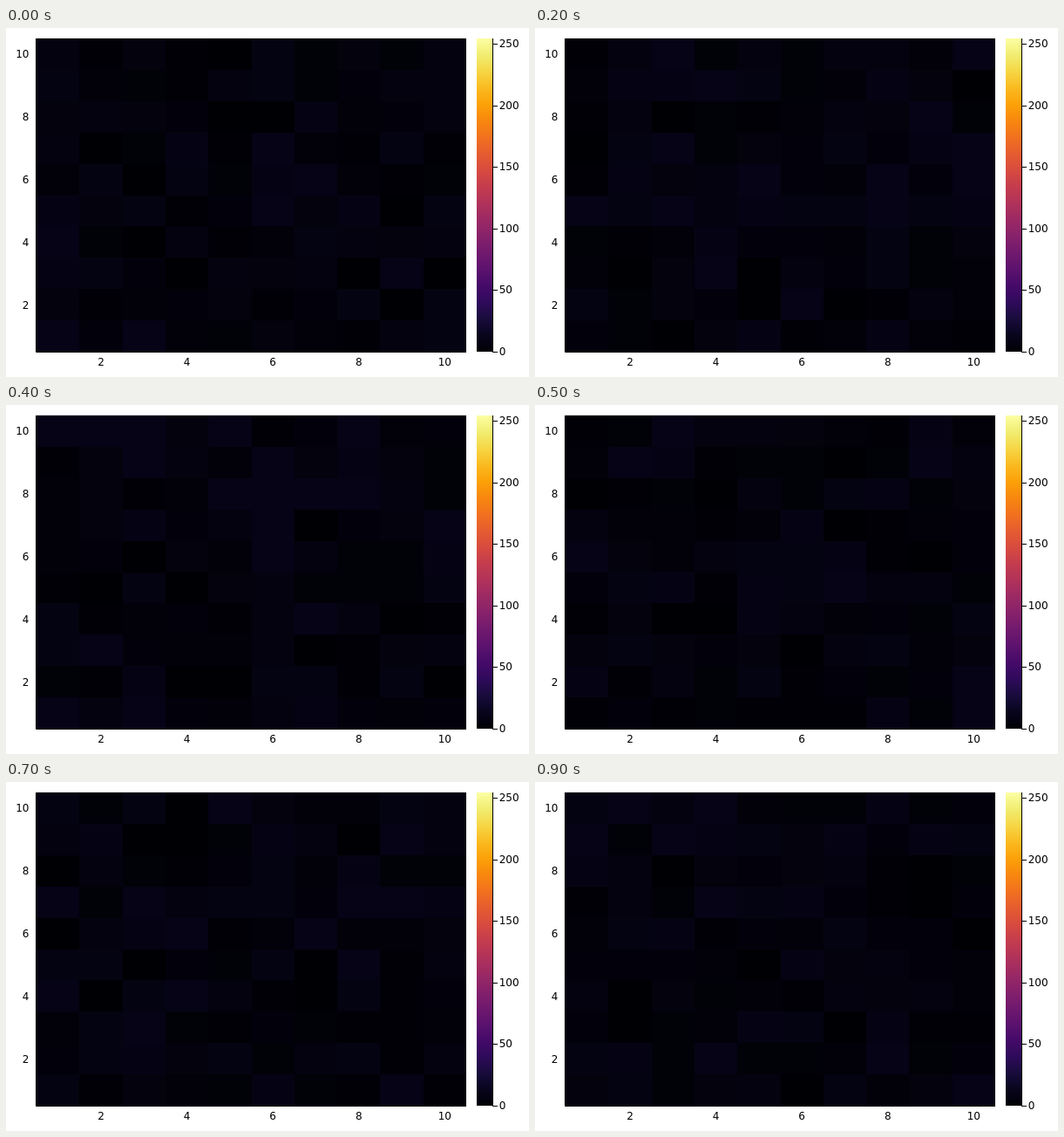
Write an HTML page that moves like this. It is 600x400 px and loops after 1000 ms.

```html
<!DOCTYPE html>
<html lang="en">
<head>
<meta charset="utf-8">
<title>Heatmap</title>
<style>
html, body { margin: 0; width: 100%; height: 100%; overflow: hidden; background: #fff; }
svg { display: block; width: 600px; height: 400px; }
text { font: 12px "DejaVu Sans", sans-serif; fill: #000; }
</style>
</head>
<body>
<svg id="plot" viewBox="0 0 600 400">
  <defs><linearGradient id="scale" x1="0" y1="1" x2="0" y2="0"></linearGradient></defs>
  <rect x="35" y="11.9" width="493" height="359"/>
  <g id="cells" shape-rendering="crispEdges"></g>
  <rect x="540" y="12" width="18" height="359" fill="url(#scale)"/>
  <path d="M34.5 12V371.5H528M558.5 12V371.5" fill="none" stroke="#000"/>
</svg>
<script>
const N = 10, STEP = 100, STEPS = 10, MAX = 9;
const LEFT = 35, TOP = 12, WIDTH = 493, HEIGHT = 359;
const inferno = ('000004 08051d 180c3c 2f0a5b 450a69 5c126e 71196e 87216b 9b2964 b1325a ' +
  'c43c4e d74b3f e55c30 f1711f f8870e fca108 faba20 f6d645 f1ed71 fcffa4').split(' ');

const plot = document.getElementById('plot');

function add(parent, tag, attrs, text) {
  const el = document.createElementNS('http://www.w3.org/2000/svg', tag);
  for (const key in attrs) el.setAttribute(key, attrs[key]);
  if (text !== undefined) el.textContent = text;
  parent.appendChild(el);
  return el;
}

// Colour of a value from 0 to 255
function colour(value) {
  const pos = value / 255 * (inferno.length - 1);
  const i = Math.min(Math.floor(pos), inferno.length - 2);
  const channel = (hex, k) => parseInt(hex.substr(k * 2, 2), 16);
  const mix = k => {
    const a = channel(inferno[i], k), b = channel(inferno[i + 1], k);
    return Math.round(a + (b - a) * (pos - i));
  };
  return `rgb(${mix(0)},${mix(1)},${mix(2)})`;
}

function randomFrom(seed) {
  let s = seed;
  return () => {
    s = (s + 0x6D2B79F5) | 0;
    let t = Math.imul(s ^ (s >>> 15), 1 | s);
    t = (t + Math.imul(t ^ (t >>> 7), 61 | t)) ^ t;
    return ((t ^ (t >>> 14)) >>> 0) / 4294967296;
  };
}

inferno.forEach((hex, i) => add(document.getElementById('scale'), 'stop',
  { offset: i / (inferno.length - 1), 'stop-color': '#' + hex }));

const edge = (start, size, i) => Math.round(start + size * i / N);
const cells = [];
for (let row = 0; row < N; row++) {
  for (let col = 0; col < N; col++) {
    const x = edge(LEFT, WIDTH, col), y = edge(TOP, HEIGHT, row);
    cells.push(add(document.getElementById('cells'), 'rect', {
      x, y,
      width: edge(LEFT, WIDTH, col + 1) - x,
      height: edge(TOP, HEIGHT, row + 1) - y
    }));
  }
}

for (let n = 2; n <= N; n += 2) {
  add(plot, 'text', { x: LEFT + WIDTH * (n - 0.5) / N, y: 387, 'text-anchor': 'middle' }, n);
  add(plot, 'text', { x: 26.5, y: 394 - 36 * n, 'text-anchor': 'end' }, n);
}
for (let v = 0; v <= 250; v += 50) {
  const y = Math.floor(371 - v * 1.41);
  add(plot, 'path', { d: `M558 ${y + 0.5}h6`, stroke: '#000' });
  add(plot, 'text', { x: 565.7, y: y + 4.3 }, v);
}

let shown = -1;
function draw(time) {
  const step = Math.floor(time / STEP) % STEPS;
  if (step !== shown) {
    shown = step;
    const random = randomFrom(step * 7919 + 17);
    for (const cell of cells) {
      cell.setAttribute('fill', colour(Math.floor(random() * (MAX + 1))));
    }
  }
}

const start = performance.now();
function tick() {
  draw(performance.now() - start);
  requestAnimationFrame(tick);
}
tick();
</script>
</body>
</html>
```
